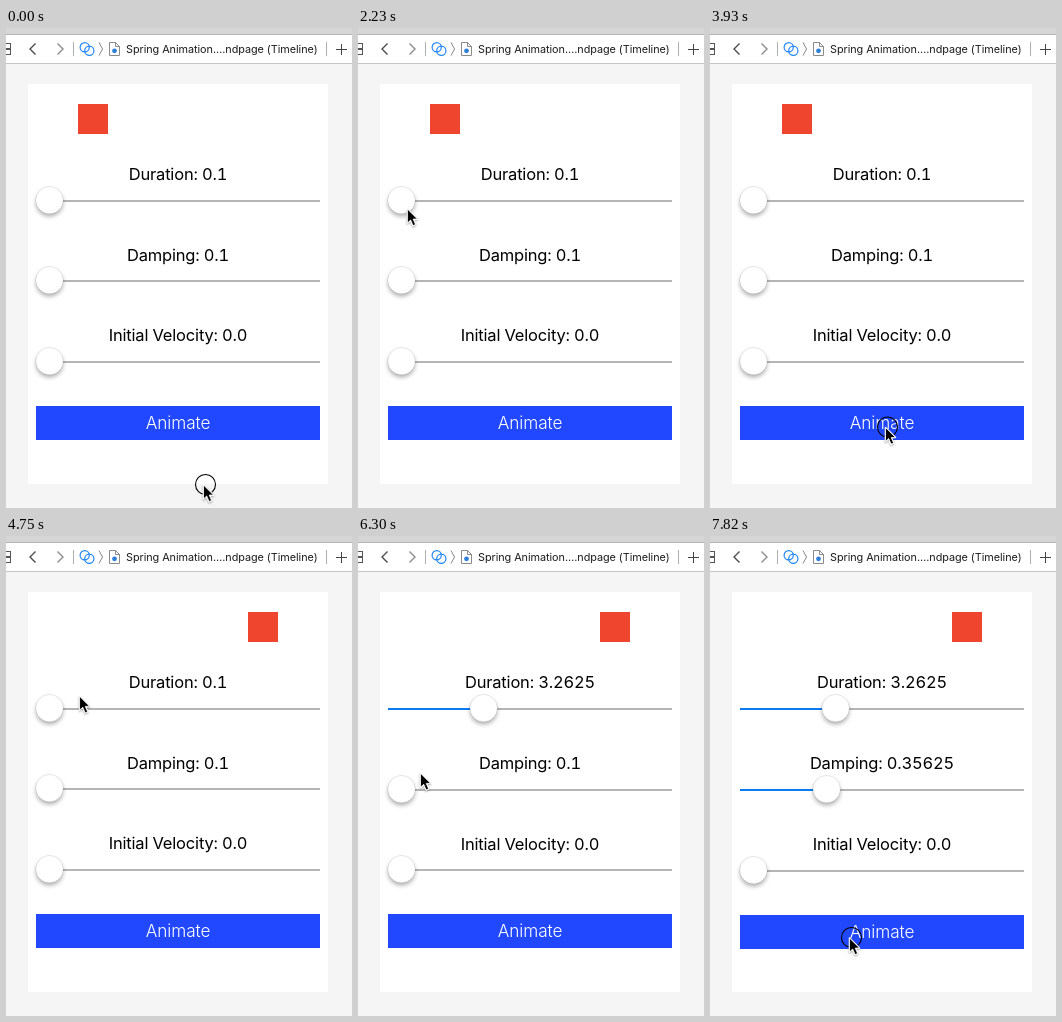
An HTML page with a canvas that plays this animation: 346x480 px, repeating every 8000 ms.

```html
<!DOCTYPE html>
<html lang="en">
<head>
<meta charset="utf-8">
<title>Spring animation controls</title>
<style>
html, body { margin: 0; width: 100%; height: 100%; overflow: hidden; background: #f5f5f5; }
canvas { position: absolute; left: 0; top: 0; width: 346px; height: 480px; }
.label {
  position: absolute; left: 22px; width: 300px; text-align: center; white-space: nowrap;
  font: 16.5px/20px Inter, "Liberation Sans", Arial, sans-serif;
  font-feature-settings: "tnum"; letter-spacing: -0.18px; color: #000;
}
</style>
</head>
<body>
<canvas id="scene"></canvas>
<div class="label" id="duration"></div>
<div class="label" id="damping"></div>
<div class="label" id="velocity"></div>
<canvas id="overlay"></canvas>
<script>
const W = 346, H = 480, LOOP = 8000, TICK = 57.5, NOTCHES = 144;
const FONT = 'Inter, "Liberation Sans", Arial, sans-serif';
const dpr = window.devicePixelRatio || 1;

function context(id) {
  const canvas = document.getElementById(id);
  canvas.width = W * dpr;
  canvas.height = H * dpr;
  const c = canvas.getContext('2d');
  c.scale(dpr, dpr);
  return c;
}

const scene = context('scene'), overlay = context('overlay');
let ctx = scene;

// Pointer moves: start, end, target x, target y, ease-out power
const home = [197.5, 456.5];
const moves = [
  [1370, 1370, 217, 438.5],
  [1420, 1420, 213, 424.5],
  [1605, 2410, 48, 172, 2.2],
  [2955, 3760, 175.5, 399, 2.2],
  [4283, 4510, 79, 157],
  [4700, 4970, 53, 175, 0.7],
  [5210, 5900, 131.5, 174, 1.25],
  [5975, 6300, 59, 245],
  [6425, 6560, 44, 248],
  [6600, 7000, 111.5, 250, 1.25],
  [7235, 7640, 139.5, 401.5]
];
const presses = [[0, 170], [3930, 4095], [5210, 5900], [6590, 7170], [7820, LOOP]];

function progress(t, start, end) {
  if (t < start) return 0;
  if (start === end) return 1;
  const elapsed = Math.floor((t - start + 8) / TICK) * TICK;
  return Math.min(1, elapsed / (end - start));
}

const easeOut = (p, power) => 1 - (1 - p) ** power;

// Sideways motion settles a little earlier than vertical motion.
function pointerAt(t) {
  let [x, y] = home;
  for (const [start, end, tx, ty, power = 1] of moves) {
    const p = progress(t, start, end);
    x += (tx - x) * easeOut(p, power * 1.4);
    y += (ty - y) * easeOut(p, power);
  }
  return [x, y];
}

const drag = (t, start, end, notch) => Math.round(notch * easeOut(progress(t, start, end), 1.75));

function rect(x, y, w, h, color) {
  ctx.fillStyle = color;
  ctx.fillRect(x, y, w, h);
}

function line(points, color, width = 1, close = false) {
  ctx.beginPath();
  points.forEach(([x, y]) => ctx.lineTo(x, y));
  if (close) ctx.closePath();
  ctx.strokeStyle = color;
  ctx.lineWidth = width;
  ctx.stroke();
}

function circle(x, y, r) {
  ctx.beginPath();
  ctx.arc(x, y, r, 0, Math.PI * 2);
}

function ring(x, y, r, color, width = 1) {
  circle(x, y, r);
  ctx.strokeStyle = color;
  ctx.lineWidth = width;
  ctx.stroke();
}

function disc(x, y, r, color) {
  circle(x, y, r);
  ctx.fillStyle = color;
  ctx.fill();
}

function shadow(alpha, blur, dy) {
  ctx.shadowColor = `rgba(0,0,0,${alpha})`;
  ctx.shadowBlur = blur * dpr;
  ctx.shadowOffsetY = dy * dpr;
}

function text(str, x, y, font, color, align, spacing) {
  ctx.font = font + ' ' + FONT;
  ctx.letterSpacing = spacing + 'px';
  ctx.textAlign = align;
  ctx.fillStyle = color;
  ctx.fillText(str, x, y);
}

function chevron(x, dx, dy, color, width) {
  line([[x, 21 - dy], [x + dx, 21], [x, 21 + dy]], color, width);
}

function toolbar() {
  rect(0, 0, W, 6, '#d6d6d6');
  rect(0, 6, W, 1, '#b4b4b4');
  rect(0, 7, W, 28, '#fff');
  rect(0, 35, W, 1, '#c4c4c4');

  ctx.strokeStyle = '#555';
  ctx.lineWidth = 1;
  for (const y of [15.5, 21.5]) ctx.strokeRect(-1.5, y, 6, 5);
  chevron(29.5, -5.5, 5.5, '#4c4c4c', 1.4);
  chevron(51.5, 5.5, 5.5, '#8c8c8c', 1.4);
  chevron(93, 3.5, 6.5, '#888', 1);
  for (const x of [67, 320]) rect(x, 14, 1, 14, '#b0b0b0');

  ring(78.7, 19.3, 4.6, '#1f86f5', 1.2);
  ring(83.3, 22.7, 4.6, '#1f86f5', 1.2);

  line([[103.5, 14.5], [109.5, 14.5], [113.5, 18.5], [113.5, 27.5], [103.5, 27.5]], '#8a8a8a', 1, true);
  line([[109.5, 14.5], [109.5, 18.5], [113.5, 18.5]], '#8a8a8a');
  disc(108.5, 22.8, 2.4, '#2f7fd6');

  text('Spring Animation.…ndpage (Timeline)', 120, 25, '10.85px', '#1c1c1c', 'left', -0.05);
  rect(330, 21, 11, 1, '#444');
  rect(335, 16, 1, 11, '#444');
}

function slider(notch, y) {
  const x = 43.5 + 257 * notch / NOTCHES;
  rect(30, y, 284, 2, '#b5b5b5');
  if (notch) rect(30, y, x - 30, 2, '#0a7cf0');
  ctx.save();
  shadow(0.3, 4, 2.7);
  disc(x, y + 0.2, 13.6, '#fff');
  ctx.restore();
  ring(x, y + 0.2, 13.7, 'rgba(0,0,0,0.13)', 0.7);
}

function number(min, max, notch) {
  const v = min + (max - min) * notch / NOTCHES;
  return v.toFixed(5).replace(/0+$/, '').replace(/\.$/, '.0');
}

function label(id, str, baseline) {
  const el = document.getElementById(id);
  if (el.textContent !== str) el.textContent = str;
  el.style.top = baseline - 16 + 'px';
}

function arrow(x, y) {
  const shape = [[0, 0], [0, 14], [3.2, 11], [5.6, 16.6], [8.1, 15.5], [5.7, 10.1], [10, 10]];
  const points = shape.map(([dx, dy]) => [x + dx, y + dy]);
  ctx.save();
  ctx.lineJoin = 'round';
  shadow(0.35, 2, 1);
  line(points, '#fff', 1.6, true);
  ctx.shadowColor = 'transparent';
  ctx.fillStyle = '#000';
  ctx.fill();
  line(points, '#fff', 0.8, true);
  ctx.restore();
}

function drawScene(t) {
  ctx = scene;
  const dur = drag(t, 5310, 5915, 46);
  const damp = drag(t, 6650, 7150, 41);
  // Each first drag nudges the rows below it by a pixel.
  const low = dur ? 1 : 0, lower = damp ? 1 : 0;

  rect(0, 0, W, H, '#f5f5f5');
  toolbar();
  rect(22, 56, 300, 400, '#fff');
  rect(t < 4040 ? 72 : 242, 76, 30, 30, '#ef452f');

  label('duration', 'Duration: ' + number(0.1, 10, dur), 152);
  label('damping', 'Damping: ' + number(0.1, 1, damp), 233);
  label('velocity', 'Initial Velocity: 0.0', 313 + low);
  slider(dur, 172);
  slider(damp, 252 + low);
  slider(0, 333 + lower);

  rect(30, 378 + lower, 284, 34, '#2148ff');
  text('Animate', 172, 401 + lower, '350 17.2px', '#fff', 'center', -0.05);
}

function drawPointer(t) {
  ctx = overlay;
  ctx.clearRect(0, 0, W, H);
  // The idle pointer fades out until it moves again.
  const alpha = t < 1370 ? 1 - progress(t, 3, 230) : 1;
  const [x, y] = pointerAt(t);
  ctx.globalAlpha = alpha;
  if (presses.some(([a, b]) => t >= a && t < b)) ring(x + 2, y, 10, '#000', 1.1);
  arrow(x, y + 0.5);
}

const begin = performance.now();
function frame() {
  const t = (performance.now() - begin) % LOOP;
  drawScene(t);
  drawPointer(t);
  requestAnimationFrame(frame);
}
frame();
</script>
</body>
</html>
```
